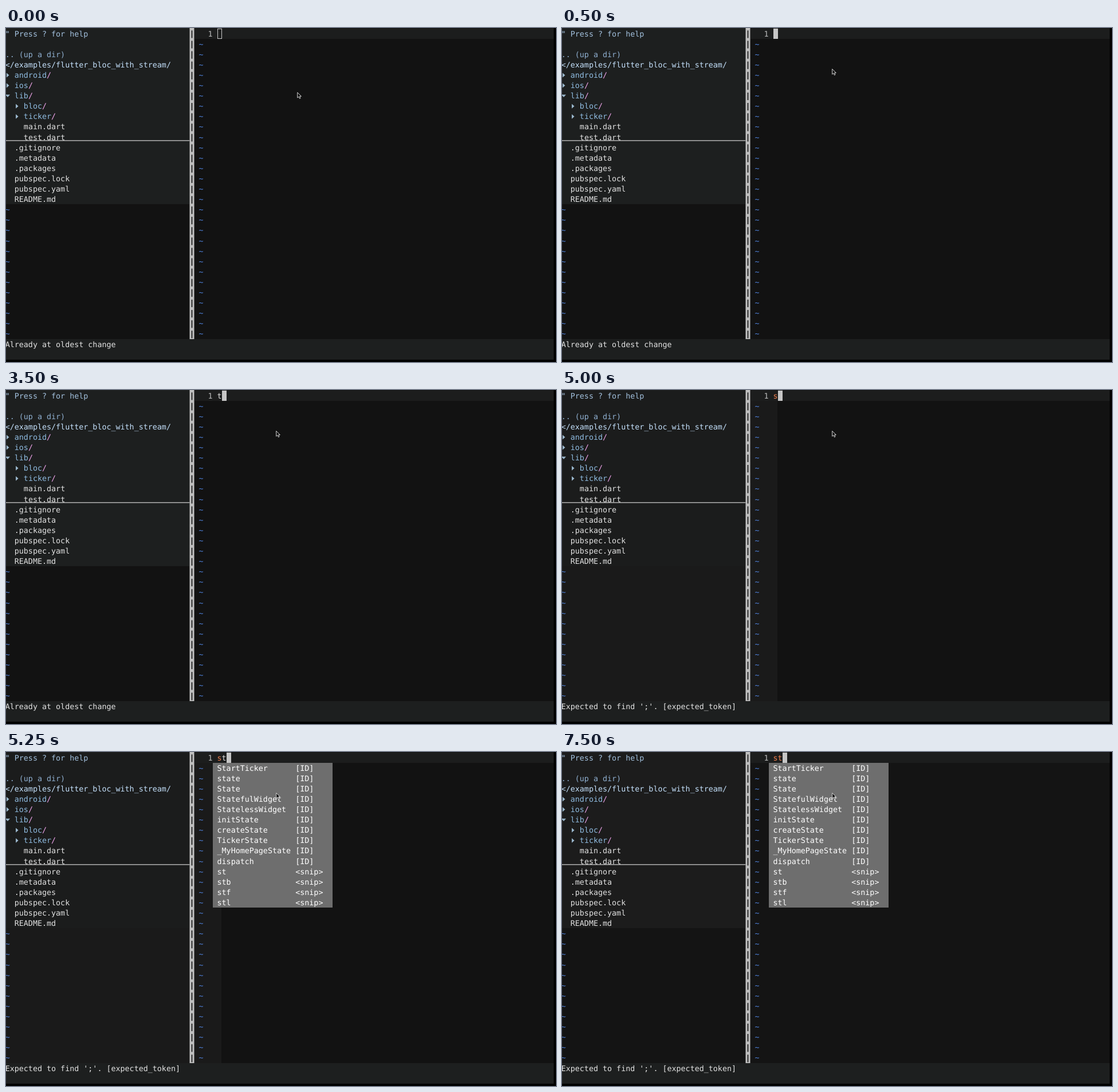
Recreate the animation shown at these times as an HTML page. Size 960 by 584 pixels, loop 8000 ms.

```html
<!DOCTYPE html>
<html lang="en">
<head>
<meta charset="utf-8">
<title>Editor completion</title>
<style>
html, body { margin: 0; width: 100%; height: 100%; overflow: hidden; background: #000; }
svg { display: block; width: 960px; height: 584px; }
text { font: 13.35px "DejaVu Sans Mono", monospace; white-space: pre; text-rendering: geometricPrecision; }
</style>
</head>
<body>
<svg id="stage" viewBox="0 0 960 584"></svg>
<script>
const stage = document.getElementById('stage');
const colX = c => c * 8.04 - 1.3;
const baseY = r => 14.5 + r * 18.1;
const FILE = '#e2e2e2', DIR = '#8fbbe0', SLASH = '#f3a6ee', TILDE = '#4f82dc', ERROR = '#f0804f';

function add(tag, attrs, parent = stage) {
  const el = document.createElementNS('http://www.w3.org/2000/svg', tag);
  for (const k in attrs) el.setAttribute(k, attrs[k]);
  return parent.appendChild(el);
}
const rect = (x, y, right, bottom, fill, parent) =>
  add('rect', { x, y, width: right - x, height: bottom - y, fill }, parent);
function write(row, col, str, fill, parent) {
  const el = add('text', { x: colX(col), y: baseY(row), fill }, parent);
  el.textContent = str;
  return el;
}
const show = (el, on) => el.setAttribute('visibility', on ? 'visible' : 'hidden');

// Backgrounds
const editor = rect(0, 0, 956, 544, '#121212');
const gutter = rect(0, 19, 376, 544, '#1a1a1a');
const tree = rect(0, 0, 320.5, 308, '#1d1f1f');
rect(329, 1, 956, 19, '#1c1d1d');
rect(0, 544, 956, 580, '#1d1f1f');

// File tree
write(0, 0, '" Press ? for help', '#a3c1de');
write(2, 0, '.. (up a dir)', '#8fafd0');
write(3, 0, '</examples/flutter_bloc_with_stream/', '#c4e0fb');
[['android', 2], ['ios', 2], ['lib', 2], ['bloc', 4], ['ticker', 4]].forEach(([name, col], i) => {
  const row = i + 4, x = (col - 2) * 8.04, y = baseY(row) - 4.5;
  write(row, col, name, DIR);
  write(row, col + name.length, '/', SLASH);
  const d = name === 'lib' ? `M${x - 1} ${y - 2}h8l-4 4.5z` : `M${x + 1} ${y - 4}l4.5 4l-4.5 4z`;
  add('path', { d, fill: '#9cb9cf' });
});
['main.dart', 'test.dart'].forEach((name, i) => write(9 + i, 4, name, FILE));
['.gitignore', '.metadata', '.packages', 'pubspec.lock', 'pubspec.yaml', 'README.md']
  .forEach((name, i) => write(11 + i, 2, name, FILE));
rect(0, 196.3, 320.5, 197.5, '#d8d8d8');

// Empty-line marks and the split bar
rect(320.5, 0, 328.5, 544, '#bfbfbf');
for (let r = 0; r < 30; r++) {
  if (r > 16) write(r, 0, '~', TILDE);
  if (r > 0) write(r, 42, '~', TILDE);
  add('path', { d: `M324.5 ${baseY(r) - 10.2}v13.2`, stroke: '#141414', 'stroke-width': 1.7 });
}

// Edited line and status
write(0, 44, '1', '#bdbdbd');
const first = write(0, 46, '', FILE);
const second = write(0, 47, 't', FILE);
const status = write(30, 0, '', FILE);
const hollow = add('rect', { x: 369.5, y: 1.5, width: 7, height: 17, fill: 'none', stroke: '#c8c8c8' });
const block = rect(0, 1, 8, 19, '#c6c6c6');

// Completion menu
const menu = add('g', {});
rect(361, 19, 570, 272, '#6e6e6e', menu);
['StartTicker', 'state', 'State', 'StatefulWidget', 'StatelessWidget', 'initState', 'createState',
  'TickerState', '_MyHomePageState', 'dispatch', 'st', 'stb', 'stf', 'stl'].forEach((word, i) => {
  write(i + 1, 46, word, '#fff', menu);
  write(i + 1, 63, i < 10 ? '[ID]' : '<snip>', '#fff', menu);
});

const pointer = add('path', {
  d: 'M.7 .7V10L2.9 8L4.4 11.4L6 10.7L4.6 7.4H7.4Z',
  fill: '#111', stroke: '#e6e6e6', 'stroke-width': 0.9
});

function draw(t) {
  const linted = t >= 4000, redrawn = t >= 7500;
  editor.setAttribute('fill', redrawn ? '#141414' : '#121212');
  tree.setAttribute('fill', redrawn ? '#1c1c1c' : linted ? '#1b1c1c' : '#1d1f1f');
  show(gutter, linted && !redrawn);

  const typed = t < 3500 ? '' : t < 4500 ? 't' : t < 5000 ? '' : t < 5250 ? 's' : 'st';
  first.textContent = typed.slice(0, 1);
  first.setAttribute('fill', linted ? ERROR : FILE);
  show(second, typed.length > 1);
  second.setAttribute('fill', t < 5750 ? FILE : ERROR);
  status.textContent = linted ? "Expected to find ';'. [expected_token]" : 'Already at oldest change';

  show(hollow, t < 500);
  show(block, t >= 500);
  block.setAttribute('x', 369 + typed.length * 8);
  show(menu, t >= 5250);
  pointer.setAttribute('transform', t < 250 ? 'translate(508 112)' : 'translate(471 71)');
}

const start = performance.now();
function tick() {
  draw((performance.now() - start) % 8000);
  requestAnimationFrame(tick);
}
tick();
</script>
</body>
</html>
```
